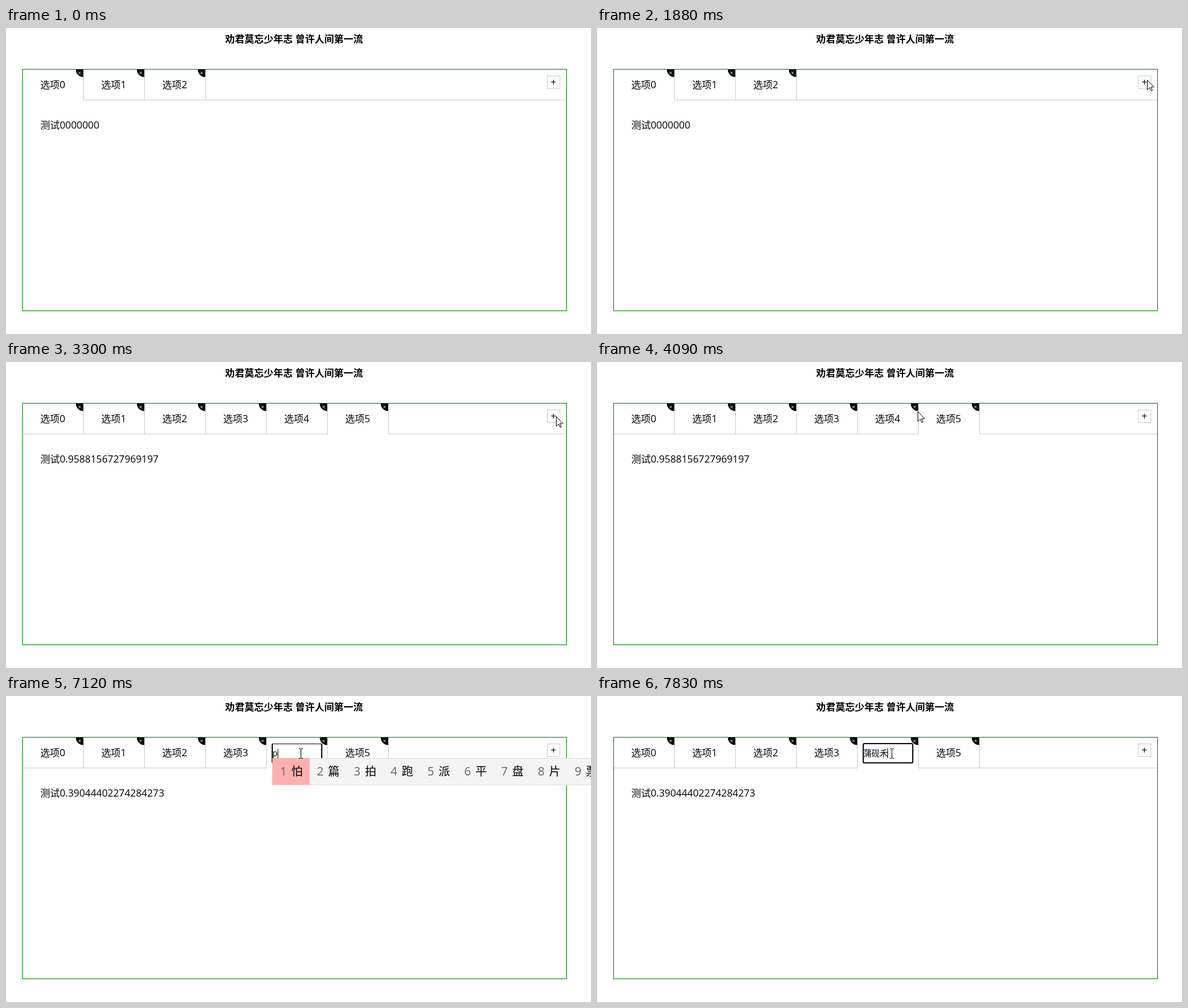
Recreate the animation shown at these times as an HTML page with a canvas. Size 969x508 px, loop 8000 ms.

```html
<!DOCTYPE html>
<html lang="zh">
<head>
<meta charset="utf-8">
<style>
  html, body { margin: 0; width: 100%; height: 100%; overflow: hidden; background: #fff; }
  canvas { display: block; }
</style>
</head>
<body>
<canvas id="stage" width="969" height="508"></canvas>
<script>
const ctx = document.getElementById('stage').getContext('2d');
const LOOP = 8000, TICK = 79;
const HAN = '"Noto Sans CJK SC", "Noto Sans CJK", sans-serif';
const LATIN = '"Open Sans", "Noto Sans", sans-serif';
const NAME = '蒲砚禾';
const contents = ['0000000', '', '', '0.2667205139624258', '0.39044402274284273', '0.9588156727969197'];

// Pointer path: tick, x, y
const path = [
  [3, 576, 465], [5, 470, 390], [7, 390, 290], [9, 440, 190], [11, 550, 120], [13, 624, 90],
  [14, 668, 79], [15, 708, 83], [16, 708, 83], [18, 795, 92], [21, 920, 101], [24, 911, 86],
  [25, 911, 86], [26, 910, 86], [35, 910, 86], [36, 911, 90], [42, 911, 90], [44, 865, 160],
  [46, 760, 217], [49, 600, 165], [52, 531, 82], [56, 488, 95]
];
// Mouse button held, in ms
const presses = [[2040, 2190], [2520, 2670], [3160, 3300], [4490, 4570], [4730, 4960]];
// Input method states: start, typed letters, candidates
const compositions = [
  [7120, 'p', '怕 篇 拍 跑 派 平 盘 片 票'],
  [7510, "p'y", '朋友 培养 平原 漂移 评语 偏远 平移'],
  [7680, "p'y'h", NAME + ' 朋友会 培养花 平原湖 朋友好 漂移后']
];

const arrow = new Path2D('M.5.5V16.5L4.5 13 7 18.5 9 17.5 6.5 12H11.5Z');

function rect(x, y, w, h, color) {
  ctx.fillStyle = color;
  ctx.fillRect(x, y, w, h);
}

function frame(x, y, w, h, color) {
  ctx.strokeStyle = color;
  ctx.lineWidth = 1;
  ctx.strokeRect(x + .5, y + .5, w - 1, h - 1);
}

// Draws mixed Chinese and Latin text, returns the end position
function text(str, x, y, size = 16, color = '#000', weight = 400) {
  ctx.fillStyle = color;
  for (const run of str.match(/[ -~]+|[^ -~]+/g)) {
    const latin = run.charCodeAt(0) < 127;
    ctx.font = `${weight} ${latin ? size * 1.025 : size}px ${latin ? LATIN : HAN}`;
    ctx.fillText(run, x, y);
    x += ctx.measureText(run).width;
  }
  return x;
}

function pointerAt(tick) {
  const next = path.findIndex(p => p[0] > tick);
  if (next === 0) return null;
  if (next < 0) return path[path.length - 1].slice(1);
  const [t0, x0, y0] = path[next - 1], [t1, x1, y1] = path[next];
  const k = (tick - t0) / (t1 - t0);
  return [Math.round(x0 + (x1 - x0) * k), Math.round(y0 + (y1 - y0) * k)];
}

function drawTab(i, active, label) {
  const left = 28 + 101 * i, right = left + 100;
  rect(right, 69, 1, 51, '#ccc');
  if (active) rect(left, 119, 100, 1, '#fff');
  ctx.fillStyle = '#000';
  ctx.beginPath();
  ctx.moveTo(right, 69);
  ctx.arc(right, 69, 12.3, Math.PI / 2, Math.PI);
  ctx.fill();
  ctx.strokeStyle = '#eee';
  ctx.lineWidth = 1;
  ctx.beginPath();
  ctx.moveTo(right - 8, 72.5); ctx.lineTo(right - 4, 76.5);
  ctx.moveTo(right - 4, 72.5); ctx.lineTo(right - 8, 76.5);
  ctx.stroke();
  if (label) text('选项' + i, left + 28.7, 100);
}

function drawInput(t, composition) {
  ctx.strokeStyle = '#101010';
  ctx.lineWidth = 2;
  ctx.beginPath();
  ctx.roundRect(441, 79, 82, 32, 2);
  ctx.stroke();
  if (t < 7120) {
    rect(441.5, 86, 34.5, 17, '#3390ff');
    text('选项4', 441.5, 100, 13.33, '#fff');
    return;
  }
  if (composition) rect(440, 78, 84, 1, '#fff');
  const end = text(composition ? composition[1] : NAME, 441.5, 100, 13.33);
  rect(Math.round(end), composition ? 88 : 87, 1, 16, '#000');
}

function drawCandidates(words) {
  const size = 19;
  rect(441, 103, 528, 45, '#f4f4f4');
  rect(441, 103, 528, 1, '#ddd');
  rect(441, 147, 528, 1, '#ddd');
  let x = 441;
  words.split(' ').forEach((word, i) => {
    const width = 42 + size * word.length;
    if (!i) rect(x, 103, width + 1, 44, '#ffb0b0');
    text(String(i + 1), x + 13, 132, size, '#666');
    text(word, x + 31.5, 132, size);
    x += width;
  });
}

function drawPointer([x, y], beam) {
  if (beam) {
    rect(x, y - 7, 1, 15, '#000');
    for (const edge of [y - 8, y + 8]) {
      rect(x - 3, edge, 3, 1, '#000');
      rect(x + 1, edge, 3, 1, '#000');
    }
    return;
  }
  ctx.save();
  ctx.translate(x, y);
  ctx.fillStyle = '#fff';
  ctx.strokeStyle = '#000';
  ctx.lineWidth = 1;
  ctx.fill(arrow);
  ctx.stroke(arrow);
  ctx.restore();
}

function draw(t) {
  const tick = Math.floor((t + 33) / TICK);
  const count = 3 + [2190, 2670, 3300].filter(start => t >= start).length;
  const active = t >= 4570 ? 4 : count > 3 ? count - 1 : 0;
  const editing = t >= 4890;
  const composition = t < 7830 && compositions.filter(c => t >= c[0]).pop();

  rect(0, 0, 969, 508, '#fff');
  text('劝君莫忘少年志 曾许人间第一流', 363, 24, 16, '#000', 700);
  rect(28, 119, 900, 1, '#ccc');
  for (let i = 0; i < count; i++) drawTab(i, i === active, !(editing && i === 4));
  frame(27, 68, 902, 402, '#008000');
  frame(896, 79, 22, 22, '#ccc');
  text('+', 902, 96);
  text('测试' + contents[active], 57, 167);
  if (editing) drawInput(t, composition);

  const pointer = pointerAt(tick);
  if (pointer && presses.some(([from, to]) => t >= from && t < to)) {
    ctx.fillStyle = 'rgba(255, 255, 0, .6)';
    ctx.beginPath();
    ctx.arc(pointer[0], pointer[1] + .5, 12, 0, 7);
    ctx.fill();
  }
  if (composition) drawCandidates(composition[2]);
  if (pointer) drawPointer(pointer, tick >= 55);
}

const start = performance.now();
function loop() {
  draw((performance.now() - start) % LOOP);
  requestAnimationFrame(loop);
}
loop();
</script>
</body>
</html>
```
